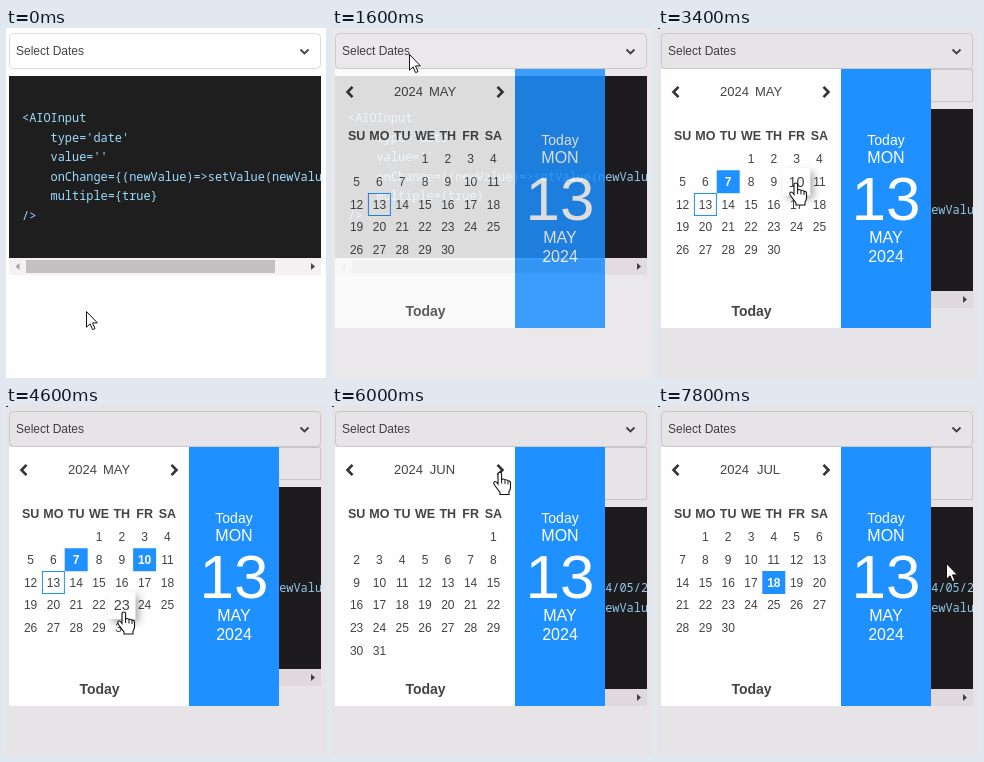
These frames come from a looping animation (320 by 350 pixels, 8000 ms). An HTML page:

```html
<!DOCTYPE html>
<html lang="en">
<head>
<meta charset="utf-8">
<title>Multiple date picker</title>
<style>
  html, body { margin: 0; width: 100%; height: 100%; overflow: hidden; background: #fefefe; }
  svg { display: block; width: 320px; height: 350px; font-family: "Liberation Sans", Arial, sans-serif; }
  .code { font: 11.91px "Noto Sans Mono", monospace; fill: #9cdcfe; white-space: pre; }
  .hover { filter: drop-shadow(3px 3px 3px rgba(0, 0, 0, .3)); }
</style>
</head>
<body>
<svg id="stage" viewBox="0 0 320 350"></svg>
<script>
const LOOP = 8000, STEP = 200;
const BLUE = '#1e90ff', INK = '#444';
const OPEN = 1600;

// start time, name, column of day 1, number of days
const MONTHS = [[0, 'MAY', 3, 30], [5800, 'JUN', 6, 31], [6400, 'JUL', 1, 30]];
// click time, month, day
const PICKS = [[2800, 'MAY', 7], [3600, 'MAY', 10], [4800, 'MAY', 23], [7000, 'JUL', 18]];
const MONTH_NO = { MAY: '05', JUN: '06', JUL: '07' };
// time, x, y of the pointer's hot spot
const POINTER = [
  [0, 80, 283], [800, 285, 24], [1200, 90, 26], [1400, 77, 26], [1800, 77, 26],
  [2400, 74, 141], [2600, 71, 152], [2800, 71, 155], [3400, 138, 155], [3600, 138, 156],
  [4400, 118, 202], [4600, 118, 206], [4800, 118, 206], [5600, 168, 67], [6400, 168, 66],
  [6800, 117, 178], [7000, 117, 178], [7200, 212, 174], [7600, 276, 161], [7800, 288, 157]
];

const colX = c => 24.6 + 22.8 * c;
const rowY = r => 131 + 22.75 * r;

const rect = (x, y, w, h, fill, extra = '') =>
  `<rect x="${x}" y="${y}" width="${w}" height="${h}" fill="${fill}" ${extra}/>`;
const path = (d, stroke, width, fill = 'none') =>
  `<path d="${d}" stroke="${stroke}" stroke-width="${width}" fill="${fill}"/>`;
const label = (s, x, y, size, fill = INK, extra = 'text-anchor="middle"') =>
  `<text x="${x}" y="${y}" font-size="${size}" fill="${fill}" ${extra}>${s}</text>`;
const bold = 'text-anchor="middle" font-weight="bold"';

function pointerAt(t) {
  const i = POINTER.findIndex(k => k[0] > t);
  if (i < 0) return POINTER[POINTER.length - 1].slice(1);
  const [t0, x0, y0] = POINTER[i - 1], [t1, x1, y1] = POINTER[i];
  const f = (t - t0) / (t1 - t0);
  return [x0 + (x1 - x0) * f, y0 + (y1 - y0) * f];
}

function selectBox() {
  return rect(3.5, 5.5, 311, 35, '#fefefe', 'rx="4" stroke="#dcdcdc"') +
    label('Select Dates', 10, 27, 12, INK, '') +
    path('M294.5 21.5l4 4l4-4', INK, 1.8);
}

function codeBlock(top, picks) {
  const dates = picks.map(([, m, d]) => `2024/${MONTH_NO[m]}/${String(d).padStart(2, '0')}`);
  const lines = [
    '&lt;AIOInput',
    "    type='date'",
    `    value='${dates.join(',')}'`,
    '    onChange={(newValue)=>setValue(newValue)}',
    '    multiple={true}',
    '/&gt;'
  ];
  const thumb = picks.length > 2 ? 200 : 249;
  return `<g transform="translate(0 ${top})">` +
    rect(3, 0, 312, 182, '#1e1e1e') +
    '<g clip-path="url(#codeClip)">' +
    lines.map((s, i) => `<text class="code" xml:space="preserve" x="16" y="${46.2 + 19.5 * i}">${s}</text>`).join('') +
    '</g>' +
    rect(3, 182, 312, 17, '#f5f1f2') + rect(20, 184, thumb, 13, '#c4bfc0') +
    path('M13.5 187v7l-4-3.5z', 'none', 0, '#a3a3a3') +
    path('M305 187v7l4-3.5z', 'none', 0, '#484848') + '</g>';
}

function dayCell(day, x, y, { picked, today, hover }) {
  let cell = '';
  if (hover) cell += rect(-11.4, -11.4, 22.8, 22.8, '#fefefe', 'class="hover"');
  if (picked) cell += rect(-11.5, -11.5, 23, 23, BLUE);
  else if (today) cell += rect(-11, -11, 22, 22, 'none', `stroke="${BLUE}"`);
  cell += picked ? label(day, 0, 4.2, 12, '#fff', bold) : label(day, 0, 4.2, 12);
  return `<g transform="translate(${x} ${y}) scale(${hover ? 1.2 : 1})">${cell}</g>`;
}

function calendar([, name, first, count], picks, hoverDay) {
  let out = rect(3, 41, 180, 259, '#fefefe') +
    path('M20.5 58.8l-5 5.2l5 5.2', '#333', 2.6) +
    path('M165.5 58.8l5 5.2l-5 5.2', '#333', 2.6) +
    label('2024', 76.5, 68, 13) + label(name, 110.5, 68, 13) +
    'SU MO TU WE TH FR SA'.split(' ').map((d, c) => label(d, colX(c), 112, 12.5, INK, bold)).join('');
  let raised = '';
  for (let day = 1; day <= count; day++) {
    const slot = first + day - 1;
    const hover = day === hoverDay;
    const cell = dayCell(day, colX(slot % 7), rowY(Math.floor(slot / 7)), {
      picked: picks.some(p => p[1] === name && p[2] === day),
      today: name === 'MAY' && day === 13,
      hover
    });
    if (hover) raised = cell; else out += cell;
  }
  return out + raised + label('Today', 93.5, 288, 14, INK, bold);
}

function todayPanel() {
  const line = (s, y, size) => label(s, 228, y, size, '#fff');
  return rect(183, 41, 90, 259, BLUE) + line('Today', 117, 14) + line('MON', 135, 16) +
    line('13', 191.5, 62) + line('MAY', 214.5, 16) + line('2024', 233.5, 16);
}

function pointer(x, y, hand) {
  const shape = hand
    ? path('M-2 1.6Q-2 0 -.2 0Q1.6 0 1.6 1.6V7Q3.5 5.8 5 7.5Q7 6.6 8 8.5Q10.5 8 10.5 10.5V15Q10.5 17 9 19V22H0V20L-5.5 12.5Q-7 10 -5.5 9.2Q-4 8.5 -2 11.5Z', '#111', 1.1, '#fff') +
      path('M1.6 7v4M5 8v3.5M8 9v3', '#111', 1)
    : path('M.5 .5V16.2L4.1 12.8L6.6 18.6L9 17.6L6.5 11.9H11.4Z', '#111', 1, '#fff');
  return `<g transform="translate(${x} ${y})">${shape}</g>`;
}

function dayUnder(x, y, [, , first, count]) {
  const c = Math.round((x - colX(0)) / 22.8), r = Math.round((y - rowY(0)) / 22.75);
  const day = r * 7 + c - first + 1;
  return c >= 0 && c < 7 && r >= 0 && day > 0 && day <= count ? day : 0;
}

function draw(t) {
  const picks = PICKS.filter(p => p[0] <= t);
  const month = MONTHS.filter(m => m[0] <= t).pop();
  const [x, y] = pointerAt(t);
  const open = t >= OPEN;
  const fade = t < OPEN + STEP ? .85 : 1;
  const tags = picks.length > 2 ? 53 : picks.length ? 33 : 0;
  const hoverDay = open ? dayUnder(x, y, month) : 0;
  const onNext = open && Math.hypot(x - 168, y - 64) < 9;

  let out = '<clipPath id="codeClip"><rect x="3" width="312" height="182"/></clipPath>' +
    rect(0, 0, 320, 350, '#fefefe') + selectBox();
  if (tags) out += rect(3.5, 41.5, 311, tags - 1, '#fefefe', 'stroke="#dcdcdc"');
  out += codeBlock(48 + tags, picks);
  if (open) {
    out += rect(0, 0, 320, 350, `rgba(30,0,40,${.1 * fade})`) +
      `<g opacity="${fade}">${calendar(month, picks, hoverDay)}${todayPanel()}</g>`;
  }
  if (tags) out += rect(0, 0, 2, 1, '#222');
  return out + pointer(x, y, hoverDay || onNext);
}

const stage = document.getElementById('stage');
const start = performance.now();
let shown = -1;

function tick() {
  const t = Math.floor((performance.now() - start) % LOOP / STEP) * STEP;
  if (t !== shown) {
    shown = t;
    stage.innerHTML = draw(t);
  }
  requestAnimationFrame(tick);
}
tick();
</script>
</body>
</html>
```
